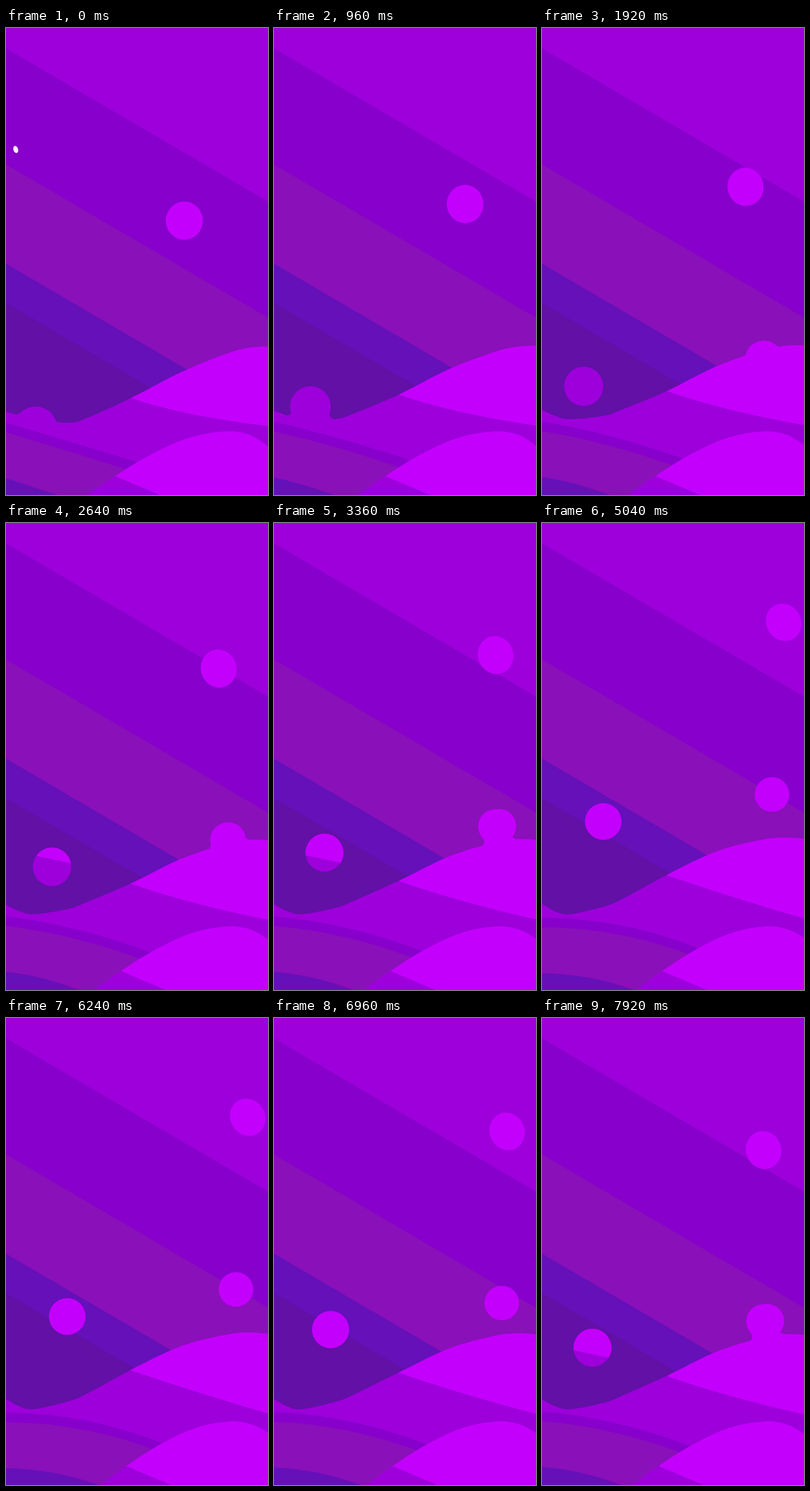
An HTML page with a canvas that plays this animation: 360x640 px, repeating every 8 s.

```html
<!DOCTYPE html>
<html lang="en">
<head>
<meta charset="utf-8">
<title>Violet hills</title>
<style>
  html, body { margin: 0; width: 100%; height: 100%; overflow: hidden; background: #9d00db; }
  canvas { display: block; width: 100vw; height: 100vh; }
</style>
</head>
<body>
<canvas id="stage" width="360" height="640"></canvas>
<script>
const ctx = document.getElementById('stage').getContext('2d');
const W = 360, H = 640, LOOP = 8000, STEP = 240, LAST = 23;
const PINK = '#c400fd', VIOLET = '#9d00db', PURPLE = '#8700cb',
      PLUM = '#8a10b9', INDIGO = '#6510b9', DUSK = '#6210a5';

const mix = (a, b, u) => a + (b - a) * u;
const progress = n => n / 21;
const easeOut = u => 1 - (1 - u) ** 2;

function fill(color) {
  ctx.fillStyle = color;
  ctx.fill();
}

function ellipse(x, y, rx, ry = rx, tilt = 0) {
  ctx.beginPath();
  ctx.ellipse(x, y, rx, ry, tilt, 0, Math.PI * 2);
}

function polygon(color, ...points) {
  ctx.beginPath();
  points.forEach(([x, y]) => ctx.lineTo(x, y));
  fill(color);
}

// Smooth curve through the points, closed below the stage.
function ridge(points) {
  const at = i => points[Math.max(0, Math.min(points.length - 1, i))];
  ctx.beginPath();
  ctx.moveTo(...points[0]);
  for (let i = 0; i < points.length - 1; i++) {
    const [a, b, c, d] = [at(i - 1), at(i), at(i + 1), at(i + 2)];
    ctx.bezierCurveTo(b[0] + (c[0] - a[0]) / 6, b[1] + (c[1] - a[1]) / 6,
                      c[0] - (d[0] - b[0]) / 6, c[1] - (d[1] - b[1]) / 6, ...c);
  }
  ctx.lineTo(W + 2, H + 2);
  ctx.lineTo(points[0][0], H + 2);
  ctx.closePath();
}

function heightAt(points, x) {
  const i = points.findIndex(p => p[0] >= x);
  const [a, b] = [points[i - 1], points[i]];
  return mix(a[1], b[1], (x - a[0]) / (b[0] - a[0]));
}

// Adds a ball to the path, joined to the ground by two round fillets,
// as long as it is above ground and near enough to cling to it.
function addBump({ x, y, r }, points) {
  const f = 7;
  const y0 = heightAt(points, x - r), y1 = heightAt(points, x + r);
  const ground = (y0 + y1) / 2, h = ground - y;
  const dx = Math.sqrt((r + f) ** 2 - (h - f) ** 2);
  if (h < -r || !(dx > f)) return;
  const a = Math.atan2(f - h, dx);
  ctx.save();
  ctx.translate(x, ground);
  ctx.rotate(Math.atan2(y1 - y0, 2 * r));
  ctx.moveTo(-dx, 0);
  ctx.arc(-dx, -f, f, Math.PI / 2, a, true);
  ctx.arc(0, -h, r, Math.PI + a, 2 * Math.PI - a);
  ctx.arc(dx, -f, f, Math.PI - a, Math.PI / 2, true);
  ctx.lineTo(dx, 20);
  ctx.lineTo(-dx, 20);
  ctx.closePath();
  ctx.restore();
}

function leftBall(n) {
  const r = 28 - 0.14 * n;
  return { x: 42 + 1.85 * n + 0.0075 * n * n, y: 519 - 7.1 * n + 0.032 * n * n + r, r };
}

function rightBall(n) {
  return { x: 295 + n, y: 502.2 - 6.2 * n, r: 23.7 };
}

// Key points [x, first y, last y]; the valley settles early, the slope rises evenly.
function hillPoints(n) {
  const u = progress(n), eased = easeOut(u);
  const valley = [[0, 526, 522], [20, 531, 533], [40, 536, 536], [85, 541, 525.5], [110, 535, 515.5]];
  const slope = [[175, 505.5, 480.5], [240, 472, 450], [300, 447.5, 434.5], [332, 438.5, 431], [362, 436, 433]];
  return [...valley.map(([x, a, b]) => [x, mix(a, b, eased)]),
          ...slope.map(([x, a, b]) => [x, mix(a, b, u)])];
}

function drawSky() {
  ctx.fillStyle = VIOLET;
  ctx.fillRect(0, 0, W, H);
  [[28, PURPLE], [187, PLUM], [323, INDIGO], [377, DUSK]].forEach(([y, color]) =>
    polygon(color, [0, y], [W, y + 210], [W, H], [0, H]));
}

function drawStar(n) {
  const size = Math.max(0, 1 - n * 0.35);
  ellipse(13.4 - n * 4, 166.5 - n * 9, 3.2 * size, 5 * size, -0.3);
  fill('#fff0ff');
}

function drawSun(n) {
  const x = 245 + 4.45 * n - 0.0145 * n * n;
  const y = 264 - 5.6 * n - 0.0236 * n * n;
  ellipse(x, y, 25.5 - 0.085 * n, 26.2, -0.025 * n);
  fill(PINK);
}

function drawBalls(n) {
  const { x, y, r } = leftBall(n), right = rightBall(n);
  const shade = y - 30 + 6.5 * (n - 8);
  ellipse(right.x, right.y, right.r);
  fill(PINK);
  ctx.save();
  ellipse(x, y, r);
  fill(VIOLET);
  ctx.clip();
  polygon(PINK, [x - 40, y - 80], [x + 40, y - 80], [x + 40, shade + 8.5], [x - 40, shade - 8.5]);
  ctx.restore();
}

// Area under a curve from the left edge of the stage.
function drawBand(color, y, cx, cy, ex, ey) {
  ctx.beginPath();
  ctx.moveTo(0, y);
  ctx.quadraticCurveTo(cx, cy, ex, ey);
  ctx.lineTo(ex, H + 5);
  ctx.lineTo(0, H + 5);
  fill(color);
}

function drawBackHill(n) {
  const u = progress(n), points = hillPoints(n);
  ctx.save();
  ridge(points);
  addBump(leftBall(n), points);
  addBump(rightBall(n), points);
  fill(VIOLET);
  ctx.clip();

  ctx.beginPath();
  ctx.moveTo(172, mix(507, 483, u));
  ctx.quadraticCurveTo(mix(240, 270, u), mix(531, 516, u), W, mix(545.5, 542, u));
  ctx.lineTo(W, 300);
  ctx.lineTo(172, 300);
  fill(PINK);

  // Straight bands bend into arches.
  const lift = 2 * Math.sin(Math.PI * u);
  const bendX = mix(88, 110, u), bend = mix(26, 0, u);
  drawBand(PURPLE, 541 - lift, bendX, 541 + bend - lift, mix(190, 218, u), mix(598, 584, u));
  drawBand(PLUM, 554 - lift, bendX, 554 + bend - lift, mix(175, 218, u), mix(608, 597, u));
  drawBand(INDIGO, 617 - lift, mix(34, 70, u), mix(628, 618, u) - lift, mix(80, 135, u), 643);
  ctx.restore();
}

function drawFrontHill(n) {
  const u = progress(n);
  const points = [[110, 642], [150, 614], [200, 584], [250, 562], [300, 553], [335, 557.5], [362, 575]]
    .map(([x, y], i) => [x + u * Math.max(0, 18 - 2.8 * i), y - u * Math.max(0, i - 5) * 5]);
  const [x, y] = points[1];
  ctx.save();
  ridge(points);
  fill(PINK);
  ctx.clip();
  polygon(VIOLET, [x - 60, y - 25], [x, y], [x + 64, H + 1], [x - 60, H + 1]);
  ctx.restore();
}

// Poses change in hard steps, run forward and then back.
function draw(time) {
  const k = Math.floor((time % LOOP) / STEP);
  const n = k <= LAST ? k : 2 * LAST + 1 - k;
  [drawSky, drawStar, drawSun, drawBalls, drawBackHill, drawFrontHill].forEach(paint => paint(n));
}

const start = performance.now();
function tick() {
  draw(performance.now() - start);
  requestAnimationFrame(tick);
}
tick();
</script>
</body>
</html>
```
